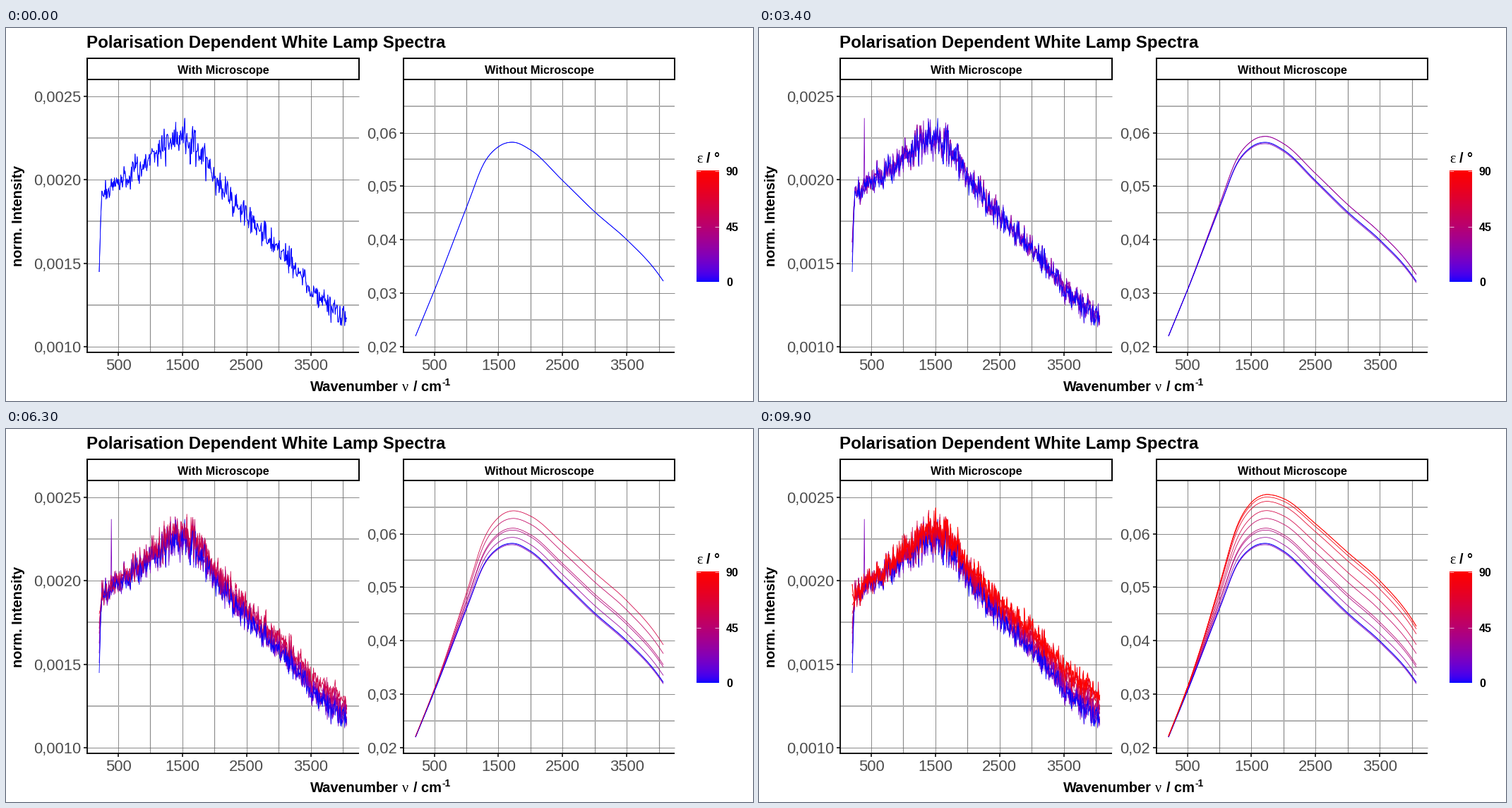
A matplotlib script that plays this animation: 1058 by 529 pixels, repeating every 10 s.

```python
import numpy as np
import matplotlib.pyplot as plt
from matplotlib.animation import FuncAnimation
from matplotlib.patches import Rectangle

W, H, DPI = 1058, 529, 64
PX = 72 / DPI  # points per pixel
FRAMES, INTERVAL = 100, 100
SANS, SERIF = "Liberation Sans", "Liberation Serif"
TOP, BOTTOM = 73, 460

# Polariser angles and the relative gain of each spectrum
ANGLES = np.array([0, 10, 20, 30, 40, 45, 50, 60, 70, 80, 90])
GAINS = np.array([0, -.01, -.03, .12, .27, .31, .51, .67, .86, .95, 1])

fig = plt.figure(figsize=(W / DPI, H / DPI), dpi=DPI, facecolor="white")
ax = fig.add_axes([0, 0, 1, 1])
ax.set_xlim(0, W)
ax.set_ylim(H, 0)
ax.axis("off")


def angle_color(angle):
    """Perceptual blend from blue to red."""
    k = min(max(angle / 90, 0), 1)
    return k ** .47, 0, (1 - k) ** 1.2


def curve(x, points):
    """Cubic Hermite curve through a few points."""
    px, py = np.array(points, float).T
    d = np.gradient(py, px)
    i = np.clip(np.searchsorted(px, x) - 1, 0, len(px) - 2)
    h = px[i + 1] - px[i]
    t = (x - px[i]) / h
    return ((1 + 2 * t) * (1 - t) ** 2 * py[i] + t * (1 - t) ** 2 * h * d[i]
            + t * t * (3 - 2 * t) * py[i + 1] + t * t * (t - 1) * h * d[i + 1])


def line(x, y, color, width, z=1):
    return ax.plot(x, y, color=color, lw=width * PX, zorder=z,
                   solid_capstyle="butt")[0]


def text(x, y, s, size, color="black", weight="bold", family=SANS, **kw):
    ax.text(x, y, s, fontsize=size * PX, color=color, weight=weight,
            family=family, zorder=30, **kw)


def panel(left, right, title, x0, y0, dy, values, digits, minor0):
    """y0 is the height of the first value, dy the distance to the next."""
    for k in range(4):
        x = x0 + 90.9 * k
        line([x, x], [TOP, BOTTOM], "#6e6e6e", .8)
        line([x + 45.4] * 2, [TOP, BOTTOM], "#8c8c8c", 1.2)
        line([x, x], [BOTTOM, BOTTOM + 5], "#222222", 1.8, 25)
        text(x, 485, str(500 + 1000 * k), 22, "#4d4d4d", "normal", ha="center")
    for y in np.arange(minor0, BOTTOM, dy):
        line([left, right], [y, y], "#b0b0b0", 2)
    for k, value in enumerate(values):
        y = y0 + k * dy
        line([left, right], [y, y], "#6e6e6e", .8)
        line([left - 5, left], [y, y], "#222222", 1.8, 25)
        label = f"{value:.{digits}f}".replace(".", ",")
        text(left - 9, y + 8, label, 22, "#4d4d4d", "normal", ha="right")
    line([left, left], [TOP, BOTTOM + 1], "black", 1.8, 25)
    line([left - 1, right], [BOTTOM, BOTTOM], "black", 1.8, 25)
    ax.add_patch(Rectangle((left, 43), right - left, 30, fc="white",
                           ec="black", lw=2 * PX, zorder=26))
    text((left + right) / 2, 64.5, title, 16.2, ha="center")


def legend():
    n = 158
    for i in range(n):
        ax.add_patch(Rectangle((978, 360 - i), 32, -1.3, lw=0, zorder=5,
                               fc=angle_color(90 * i / (n - 1)),
                               antialiased=False))
    for angle in (0, 45, 90):
        y = 360 - angle * 157 / 90
        for x in (978, 1004):
            line([x, x + 6], [y, y], (1, 1, 1, .7), 1, 6)
        text(1020, y + 6, str(angle), 16)
    text(978, 191, "ε", 20, weight="normal", family=SERIF)
    text(992, 191, "/ °", 20)


panel(115, 500, "With Microscope", 159, 97, 118.3,
      np.arange(.0025, .0009, -.0005), 4, 156)
panel(563, 947, "Without Microscope", 606.5, 148.5, 75.9,
      np.arange(.06, .015, -.01), 2, 110.5)
legend()
text(114, 28, "Polarisation Dependent White Lamp Spectra", 24.1)
text(431, 515, "Wavenumber", 20)
text(561, 515, "ν", 20, weight="normal", family=SERIF)
text(577, 515, "/ cm", 20)
text(618, 507, "-1", 14)
text(18, 266.5, "norm. Intensity", 20, rotation=90, ha="center", va="center")

# Noisy spectra, left panel
rng = np.random.default_rng(12)
N = 470
xl = np.linspace(132, 482.7, N)
body = curve(xl, [(132, 240), (165, 213), (200, 189), (245, 158), (265, 165),
                  (300, 217), (355, 281), (405, 335), (440, 378), (483, 414)])
lift = 37 * ((xl - 132) / 351) ** .8
spread = 9 + 4 * np.exp(-((xl - 250) / 60) ** 2)
shared = rng.normal(size=N)
ramp = np.clip(np.arange(N) / 4, 0, 1)


def noisy(angle, gain):
    noise = np.clip(.75 * shared + .65 * rng.normal(size=N), -2.4, 2.4)
    start = 346 - 1.4 * angle
    y = start + (body - gain * lift + spread * noise - start) * ramp
    if angle == 20:  # cosmic ray
        y = np.where(abs(xl - 149) < .4, 128, y)
    return y


# Smooth spectra, right panel
xr = np.linspace(580, 931, 240)
base = curve(xr, [(580, 437), (606, 374), (652, 255), (678, 190), (698, 168),
                  (718, 162), (743, 173), (788, 216), (833, 260), (879, 300),
                  (924, 349), (931, 359)])
rise = (72 / (1 + np.exp((655 - xr) / 20))
        + 14 * np.sin(np.pi * np.clip((xr - 725) / 250, 0, 1)))

left_data = [noisy(a, g) for a, g in zip(ANGLES, GAINS)]
right_data = [base - g * rise for g in GAINS]


def depth(angle):
    """Low angles stack downwards from blue, high ones cover everything."""
    return 10 + (angle if angle > 50 else -angle) / 20


marks = [(line(xl, l, angle_color(a), .8, depth(a)),
          line(xr, r, angle_color(a), .8, depth(a)))
         for a, l, r in zip(ANGLES, left_data, right_data)]
live = (line(xl, left_data[0], "blue", .8), line(xr, right_data[0], "blue", .8))


def ease(t):
    return 16 * t ** 5 if t < .5 else 1 - 16 * (1 - t) ** 5


def draw(frame):
    now = 90 * frame / (FRAMES - 1)
    for a, pair in zip(ANGLES, marks):
        for mark in pair:
            mark.set_visible(a <= now + 1e-6)
    i = min(np.searchsorted(ANGLES, now + 1e-6) - 1, len(ANGLES) - 2)
    a, b = ANGLES[i], ANGLES[i + 1]
    k = ease((now - a) / (b - a))
    for art, data in zip(live, (left_data, right_data)):
        art.set_ydata(data[i] + k * (data[i + 1] - data[i]))
        art.set_color(angle_color(a + k * (b - a)))
        art.set_zorder(depth(b) + .01)
    return live


anim = FuncAnimation(fig, draw, frames=FRAMES, interval=INTERVAL,
                     repeat=True, repeat_delay=0)
plt.show()
```
